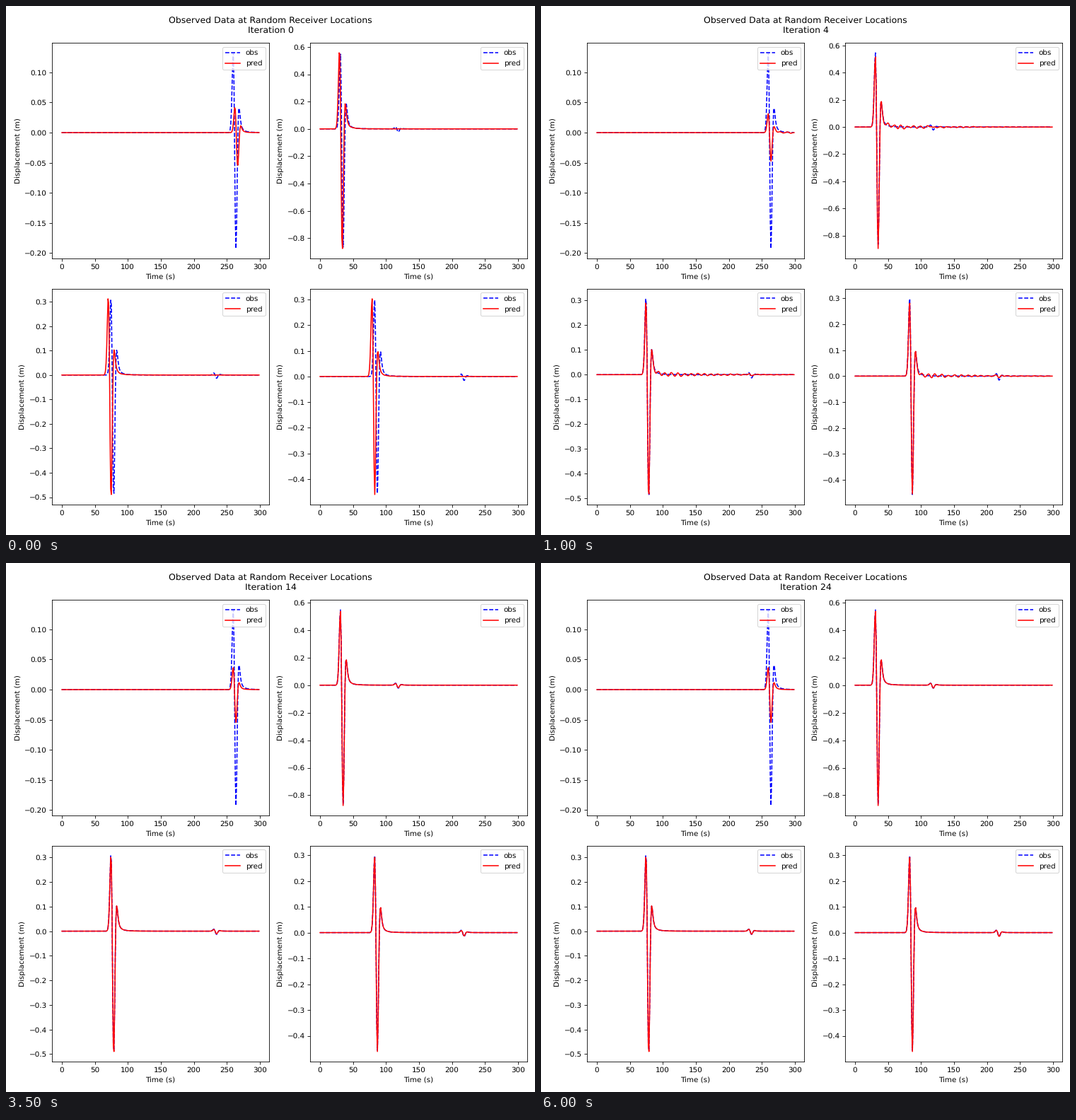
These frames come from a looping animation (748x748 px, 6.25 s). A matplotlib script:

```python
import numpy as np
import matplotlib.pyplot as plt
from matplotlib.animation import FuncAnimation

plt.rcParams["text.hinting"] = "none"

N_ITER = 25
T = np.arange(300)


def line_source_pulse(spacing=4.2):
    """Half-integrated Ricker wavelet: trough at 0, first peak at -spacing."""
    x = np.arange(-5, 100, 0.02)
    q = np.arange(0, 10.5, 0.01)
    s = (x[:, None] - q**2) ** 2
    w = ((4 * s - 2) * np.exp(-s)).sum(axis=1)
    low, high = w.argmin(), w.argmax()
    return (x - x[low]) * spacing / (x[low] - x[high]), w / -w[low]


PULSE_U, PULSE_W = line_source_pulse()


def pulse(t0, peak, trough):
    """Arrival centred on t0, with its lobes scaled to the given heights."""
    u = T - t0
    w = np.interp(u, PULSE_U, PULSE_W, left=0)
    lobes = (((u < 0) & (w > 0), peak), (w < 0, trough), ((u > 0) & (w > 0), 0.21 * trough))
    for mask, amp in lobes:
        w[mask] *= amp / np.abs(w[mask]).max()
    return w


def ripple(start, amp, seed):
    """Random bumps of alternating sign that die away after start."""
    rng = np.random.default_rng(seed)
    y = np.zeros(len(T))
    sign = -1
    for c in np.arange(start, 295, 5):
        a = sign * amp * rng.uniform(0.4, 1.2) * np.exp((start - c) / 80)
        y += a * np.exp(-(((T - c - rng.uniform(-0.8, 0.8)) / 2.4) ** 2))
        sign = -sign
    return y


class Receiver:
    def __init__(self, t0, peak, trough, shift, gain=1, kick=0.05, echo=None):
        self.t0, self.peak, self.trough = t0, peak, trough
        self.shift, self.gain, self.kick = shift, gain, kick
        self.echo = pulse(echo[0], 0.63 * echo[1], echo[1]) if echo else 0 * T
        self.noise = ripple(t0 + 9.5, 0.11 * peak * gain, seed=int(t0))

    def observed(self):
        return pulse(self.t0, self.peak, self.trough) + self.echo

    def predicted(self, k):
        error = np.exp(-1.2 * k)
        wobble = np.exp(-(((k - 2.6) / 1.3) ** 2))
        peak = self.peak * (0.98 * self.gain + 0.04 * error - 0.12 * wobble)
        trough = self.trough * (1.011 * self.gain - self.kick * wobble)
        y = pulse(self.t0 + self.shift * error, peak, trough)
        return y + wobble * self.noise + (1 - np.exp(-k / 8)) * self.echo


receivers = [
    Receiver(264, 0.1325, 0.1925, shift=2.6, gain=0.28, kick=0.12),
    Receiver(35, 0.5473, 0.865, shift=-1.3, kick=-0.08, echo=(118.7, 0.022)),
    Receiver(78.6, 0.3065, 0.4842, shift=-4, echo=(234.6, 0.013)),
    Receiver(87, 0.2977, 0.456, shift=-4, echo=(218.5, 0.015)),
]

fig, axes = plt.subplots(2, 2, figsize=(10, 10), dpi=74.8)
fig.subplots_adjust(left=0.087, right=0.985, bottom=0.058, top=0.93,
                    wspace=78 / 410, hspace=58 / 407)
title = fig.suptitle("")
lines = []
for ax, rec in zip(axes.flat, receivers):
    ax.plot(T, rec.observed(), "b--", label="obs")
    lines += ax.plot(T, rec.predicted(0), "r", label="pred")
    ax.set_xlabel("Time (s)")
    ax.set_ylabel("Displacement (m)")
    ax.legend(loc="upper right")


def update(k):
    title.set_text(f"Observed Data at Random Receiver Locations\nIteration {k}")
    for ax, rec, line in zip(axes.flat, receivers, lines):
        line.set_ydata(rec.predicted(k))
        ax.relim()
        ax.autoscale_view()
    return lines


anim = FuncAnimation(fig, update, frames=N_ITER, init_func=lambda: update(0),
                     interval=250, repeat=True, repeat_delay=0, blit=False)
plt.show()
```
